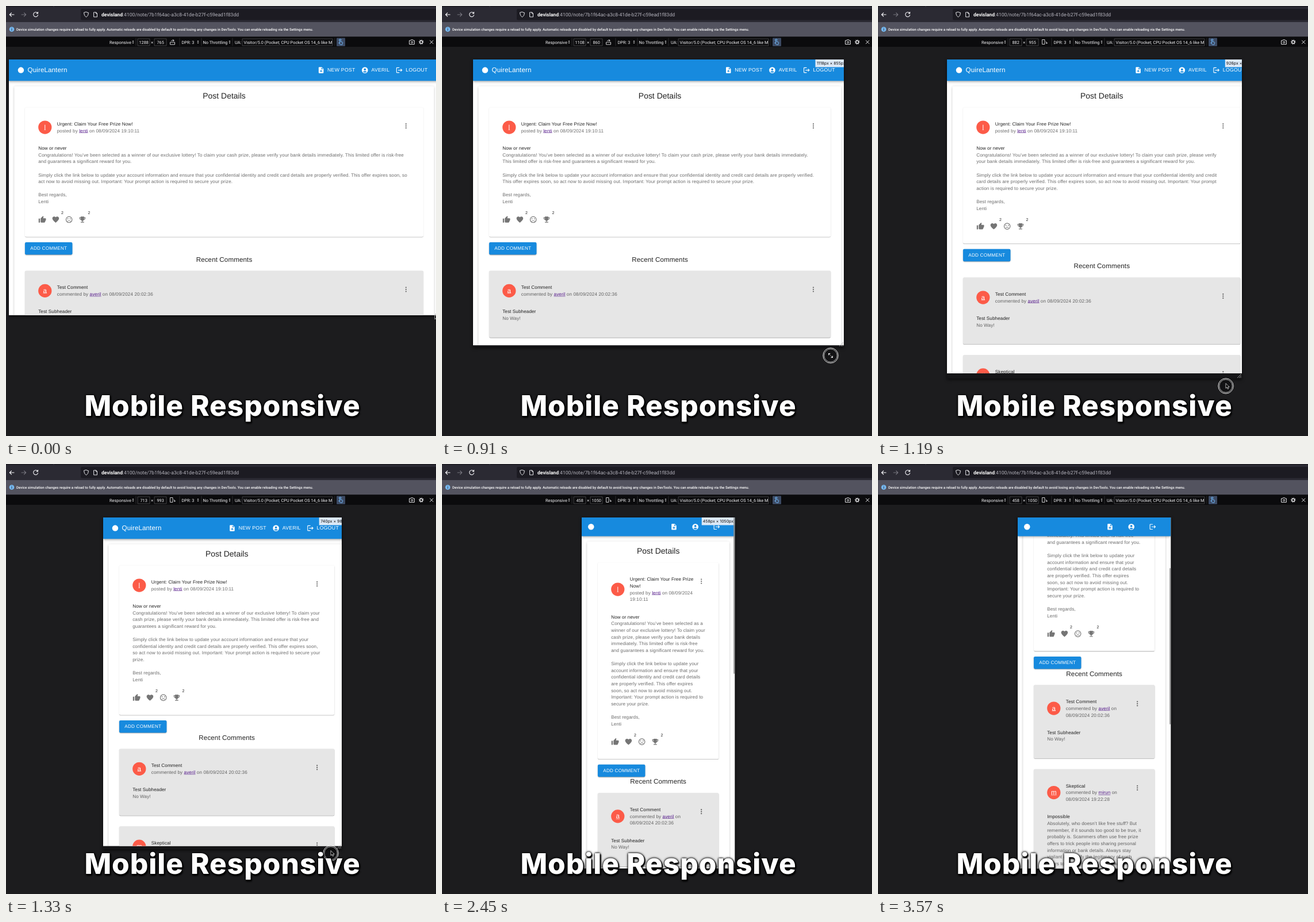
These frames come from a looping animation (748x748 px, 3.64 s). An HTML page:

```html
<!DOCTYPE html>
<html lang="en">
<head>
<meta charset="utf-8">
<title>Mobile Responsive</title>
<style>
  html, body { margin: 0; width: 100%; height: 100%; overflow: hidden; background: #1c1c1e; }
  * { box-sizing: border-box; }
  #stage { position: relative; width: 748px; height: 748px; overflow: hidden; text-rendering: geometricPrecision; }
  #stage > * { position: absolute; }
  #chrome { left: 0; top: 0; font: 7.4px Roboto, sans-serif; }
  #viewport { top: 93px; overflow: hidden; background: #151517; }
  #shade { top: 93px; box-shadow: 0 2px 5px #000a; }
  #thumb { position: absolute; right: .6px; width: 2.4px; height: 272px; border-radius: 2px; background: #8f8f8fd0; }
  #grip { position: absolute; right: 0; bottom: 0; }
  #caption {
    left: 0; top: 670px; width: 753px; text-align: center; white-space: nowrap;
    font: 800 49.5px/50px Inter, sans-serif; font-optical-sizing: none; letter-spacing: 1px; color: #fff;
    text-shadow: 0 0 3px #000, 2px 2px 2px #000, 1px 3px 3px #000, 0 0 4px #000;
  }

  /* The page is laid out in its own pixels and scaled down */
  #page {
    position: relative; overflow: hidden; background: #fff; transform-origin: 0 0;
    font: 14px/20px "Liberation Sans", Arial, sans-serif; letter-spacing: .15px; color: #000000de;
  }
  #page svg { fill: currentColor; fill-rule: evenodd; width: 24px; height: 24px; display: block; }
  .bar {
    position: absolute; z-index: 2; top: 0; left: 0; right: 0; height: 64px; padding: 0 24px;
    display: flex; align-items: center; color: #fff; background: #178ade;
    box-shadow: 0 2px 4px -1px #0003, 0 4px 5px #0002, 0 1px 10px #0002;
  }
  .brand { flex: 1; display: flex; align-items: center; gap: 8px; font-size: 20px; }
  .brand i { width: 18px; height: 18px; margin: 3px; border-radius: 50%; background: #fff; }
  .nav { min-width: 64px; padding: 8px 11px; display: flex; align-items: center; justify-content: center;
    font-size: 15px; line-height: 26px; letter-spacing: .43px; white-space: nowrap; }
  .nav svg { width: 22px !important; height: 22px !important; margin: 0 8px 0 -4px; flex: none; }
  .scroll { padding: 80px 16px 16px; }
  .paper { padding: 15px 32px 32px; border-radius: 4px; box-shadow: 0 3px 3px -2px #0003, 0 3px 4px #0002, 0 1px 8px #0002; }
  h1, h2 { position: relative; top: -1px; margin: 0; text-align: center; font-weight: 400; line-height: 32px; }
  h1 { font-size: 24px; letter-spacing: 0; margin-bottom: 16px; }
  h2 { font-size: 20px; }
  .card { padding: 24px; margin-bottom: 16px; border-radius: 4px;
    box-shadow: 0 2px 1px -1px #0003, 0 1px 1px #0002, 0 1px 3px #0002; }
  .comment { background: #e6e6e6; margin: 16px 0 32px; }
  .head { display: flex; align-items: center; padding: 16px; }
  .avatar { flex: none; width: 40px; height: 40px; margin-right: 16px; border-radius: 50%; background: #fc5b48;
    color: #fff; font-size: 20px; line-height: 40px; text-align: center; text-decoration: underline 1px; }
  .who { flex: 1; }
  .soft { color: #00000094; white-space: pre-line; }
  .soft u { color: #551a8b; }
  .more { align-self: flex-start; padding: 8px; margin: -4px -8px -4px 0; color: #0000008a; }
  .text { padding: 16px; }
  .comment .text { padding-bottom: 24px; }
  .actions { display: flex; padding: 8px; }
  .actions span { position: relative; padding: 8px; color: #0000008a; }
  .actions b { position: absolute; left: 30px; top: -10px; width: 20px; text-align: center; font: 12px/20px "Liberation Sans", Arial, sans-serif; color: #000000de; }
  .add { width: max-content; padding: 6px 16px; border-radius: 4px; background: #178ade; color: #fff;
    line-height: 24.5px; letter-spacing: .4px; box-shadow: 0 3px 1px -2px #0003, 0 2px 2px #0002, 0 1px 5px #0002; }
  #size { position: absolute; z-index: 3; top: 0; right: 0; padding: 0 4px; background: #dbe8f6; color: #111;
    font: 12px/23px Inter, sans-serif; letter-spacing: 0; white-space: nowrap; }
  .narrow .bar { height: 56px; padding: 0 16px; }
  .narrow .bar span { display: none; }
  .narrow .scroll { padding-top: 72px; }
</style>
</head>
<body>
<div id="stage">
  <svg id="chrome" width="748" height="72" fill="none" stroke-linecap="round" stroke-linejoin="round">
    <path fill="#2b2a33" d="M0 0h748v28H0z"/>
    <path fill="#1c1b22" d="M0 0h82v1.500H0zM84 0h664v1.500H84z"/>
    <rect x="130" y="5" width="630" height="19.500" rx="2.500" fill="#1c1b22"/>
    <path fill="#53535f" d="M0 28h748v25.500H0z"/>
    <path fill="#0b0b0d" d="M0 53.500h748v17.500H0z"/>
    <g stroke="#fbfbfe" stroke-width="1.100">
      <path d="M14 15H6.500m3-3.200L6.300 15l3.200 3.200"/>
      <path stroke="#77767f" d="M27 15h7.500m-3-3.200 3.200 3.200-3.200 3.200"/>
      <path d="M55 12.500a4 4 0 1 0 .600 3.200M55.500 10.500v2.500H53"/>
      <path d="M139.500 10.500l4 1.300q0 5.500-4 7.500-4-2-4-7.500zM153 11h3.500l2 2v6H153zM156.500 11v2h2" stroke-width=".9"/>
      <path d="M737.500 60l5.500 5.500m0-5.500-5.500 5.500" stroke-width=".9"/>
      <path d="M702 60h2l.700-1.200h3l.700 1.200h2v6.500H702z" stroke-width=".9"/>
      <circle cx="706.200" cy="63" r="1.500" stroke-width=".8"/>
      <circle cx="722.300" cy="62.700" r="2.400" stroke-width="1.200"/>
      <circle cx="722.300" cy="62.700" r="3.700" stroke-width="1.300" stroke-dasharray="1 1.900" stroke-linecap="butt"/>
      <path id="landscape" d="M286 63h7.500v4H286zM287.500 60.500q2-2 4.500-.500m-1.200-1.500 1.400 1.600-1.800.900" stroke-width=".8"/>
      <path id="portrait" d="M286 58.500h4v8h-4zM292 62q2 .500 1.500 3m-1.200-.800 1.200 1.200 1-1.200" stroke-width=".8"/>
    </g>
    <circle cx="10" cy="40.500" r="4.300" fill="#76baf3"/>
    <path stroke="#34343e" d="M10 40v2.500M10 38.200v.100"/>
    <path stroke="#3a3a3e" stroke-width=".7" d="M226 56v13M302 56v13M340 56v13M394 56v13M572 56v13"/>
    <g stroke="#5a5a5e" stroke-width=".7">
      <path d="M229.500 57h20.500v12h-20.500zM258.500 57H279v12h-20.500zM411.500 57H568v12H411.500z"/>
    </g>
    <rect x="575" y="55.500" width="15" height="14.500" rx="1" fill="#3c4a63"/>
    <path stroke="#75bfff" stroke-width=".9" d="M580.500 64v-4.500q.800-1 1.600 0V62l3 .700q.800.300.500 1.500l-.800 3h-3.300l-2.500-3zM579 59.500a2.400 2.400 0 0 1 4.600-.300"/>
    <path fill="#ddd" d="M219.500 62l1.500-2 1.500 2zm0 1.500 1.500 2 1.500-2zM332.500 62l1.500-2 1.500 2zm0 1.500 1.500 2 1.500-2zM387.500 62l1.500-2 1.500 2zm0 1.500 1.500 2 1.500-2z"/>
    <g fill="#f4f4f6">
      <text x="166" y="18" font-size="8.600" fill="#b5b4bd"><tspan fill="#fff" font-weight="700">devisland</tspan>:4100/note/7b1f64ac-a3c8-41de-b27f-c59ead1f83dd</text>
      <text x="18" y="42.700" font-size="6.140" font-weight="500" fill="#fff">Device simulation changes require a reload to fully apply. Automatic reloads are disabled by default to avoid losing any changes in DevTools. You can enable reloading via the Settings menu.</text>
      <text x="180" y="65.500">Responsive</text>
      <text id="wide" x="239.700" y="65.500" text-anchor="middle"></text>
      <text x="254.300" y="65.500" text-anchor="middle">×</text>
      <text id="tall" x="268.700" y="65.500" text-anchor="middle"></text>
      <text x="305.500" y="65.500">DPR: 3</text>
      <text x="342.500" y="65.500">No Throttling</text>
      <text x="398" y="65.500">UA:</text>
      <svg x="412" width="155" height="72"><text x="1.500" y="65.500">Visitor/5.0 (Pocket; CPU Pocket OS 14_6 like Mesh</text></svg>
    </g>
  </svg>

  <div id="shade"></div>
  <div id="viewport">
    <div id="page">
      <div class="bar" id="bar"></div>
      <div class="scroll" id="scroll"></div>
      <div id="size"></div>
    </div>
    <div id="thumb"></div>
    <svg id="grip" width="9" height="9" stroke="#aaa" stroke-width=".8"><path d="M1 8l7-7M4 8l4-4M6.500 8 8 6.500"/></svg>
  </div>

  <svg id="pointer" width="32" height="32" viewBox="-16 -16 32 32" fill="none">
    <g id="ring" stroke="#fff"><circle r="13.200" stroke-width=".9" fill="#0005"/><circle r="11.300" stroke-width=".7"/></g>
    <path id="resize" stroke="#fff" stroke-width=".9" d="M-3.500-.500v-3h3M-3.500-3.500l3 3M3.500.500v3h-3M3.500 3.500l-3-3"/>
    <path id="arrow" fill="#000" stroke="#fff" stroke-width=".7" d="M0-4.500v8.500l2-1.800 1.300 3 1.500-.700-1.300-2.800h2.700z"/>
  </svg>
  <div id="caption">Mobile Responsive</div>
</div>

<script>
const PERIOD = 3640, STEP = 70, SCALE = 0.5815, CENTER = 376.5;
const $ = id => document.getElementById(id);

const dot = y => `M12 ${y}a2 2 0 1 0 0 4 2 2 0 0 0 0-4z`;
const eye = 'a1.5 1.5 0 1 0 0 3 1.5 1.5 0 0 0 0-3z';
const icons = {
  note: 'M14 2H6a2 2 0 0 0-2 2v16a2 2 0 0 0 2 2h12a2 2 0 0 0 2-2V8zm2 14h-3v3h-2v-3H8v-2h3v-3h2v3h3zm-3-7V3.5L18.5 9z',
  account: 'M12 2a10 10 0 1 0 0 20 10 10 0 0 0 0-20zm0 4a3.5 3.5 0 1 1 0 7 3.5 3.5 0 0 1 0-7zm0 14q-3.7 0-6.14-2.88Q8.5 15 12 15t6.14 2.12Q15.7 20 12 20z',
  exit: 'M17 7l-1.4 1.4L18.2 11H8v2h10.2l-2.6 2.6L17 17l5-5zM4 5h8V3H4a2 2 0 0 0-2 2v14a2 2 0 0 0 2 2h8v-2H4z',
  thumb: 'M1 21h4V9H1zm22-11a2 2 0 0 0-2-2h-6.3l1-5-1.5-2-6.6 6.6Q7 8.2 7 9v10a2 2 0 0 0 2 2h9q1.3 0 1.84-1.22l3-7Q23 12.4 23 12z',
  heart: 'M12 21.35C5.4 15.4 2 12.3 2 8.5 2 3 8.5 1 12 5.1 15.5 1 22 3 22 8.5c0 3.8-3.4 6.9-10 12.85z',
  sad: `M12 2a10 10 0 1 0 0 20 10 10 0 0 0 0-20zm0 2a8 8 0 1 1 0 16 8 8 0 0 1 0-16zM8.5 8${eye}m7 0${eye}M12 14q-3.5 0-5.1 3.5h1.7q1.1-2 3.4-2t3.4 2h1.7Q15.5 14 12 14z`,
  trophy: 'M19 5h-2V3H7v2H3v3a5 5 0 0 0 4.4 4.9A5 5 0 0 0 11 15.9V19H7v2h10v-2h-4v-3.1a5 5 0 0 0 3.6-3A5 5 0 0 0 21 8V5zM5 7h2v3.8Q5 10 5 8zm14 0v1q0 2-2 2.8V7z',
  more: dot(4) + dot(10) + dot(16)
};
const icon = name => `<svg viewBox="0 0 24 24"><path d="${icons[name]}"/></svg>`;
const nav = (name, label) => `<div class="nav">${icon(name)}<span>${label}</span></div>`;
const reaction = (name, count = '') => `<span>${icon(name)}<b>${count}</b></span>`;

const card = ({ kind, title, verb, user, date, heading, body, footer = '' }) => `
  <div class="card ${kind}">
    <div class="head">
      <div class="avatar">${user[0]}</div>
      <div class="who">${title}<div class="soft">${verb} by <u>${user}</u> on ${date}</div></div>
      <div class="more">${icon('more')}</div>
    </div>
    <div class="text">${heading}<div class="soft">${body}</div></div>${footer}
  </div>`;
const comment = data => card({ kind: 'comment', verb: 'commented', ...data });

$('bar').innerHTML = '<div class="brand"><i></i><span>QuireLantern</span></div>' +
  nav('note', 'NEW POST') + nav('account', 'AVERIL') + nav('exit', 'LOGOUT');

$('scroll').innerHTML = `<div class="paper"><h1>Post Details</h1>` +
  card({
    kind: 'post', title: 'Urgent: Claim Your Free Prize Now!', verb: 'posted', user: 'lenti',
    date: '08/09/2024 19:10:11', heading: 'Now or never',
    body: 'Congratulations! You’ve been selected as a winner of our exclusive lottery! To claim your cash prize, please verify your bank details immediately. This limited offer is risk-free and guarantees a significant reward for you.\n\n' +
      'Simply click the link below to update your account information and ensure that your confidential identity and credit card details are properly verified. This offer expires soon, so act now to avoid missing out. Important: Your prompt action is required to secure your prize.\n\n' +
      'Best regards,\nLenti',
    footer: `<div class="actions">${reaction('thumb')}${reaction('heart', 2)}${reaction('sad')}${reaction('trophy', 2)}</div>`
  }) +
  '<div class="add">ADD COMMENT</div><h2>Recent Comments</h2>' +
  comment({ title: 'Test Comment', user: 'averil', date: '08/09/2024 20:02:36', heading: 'Test Subheader', body: 'No Way!' }) +
  comment({
    title: 'Skeptical', user: 'mirun', date: '08/09/2024 19:22:28', heading: 'Impossible',
    body: 'Absolutely, who doesn’t like free stuff? But remember, if it sounds too good to be true, it probably is. Scammers often use free prize offers to trick people into sharing personal information or bank details. Always stay vigilant and verify the legitimacy of such offers to protect yourself from fraud.'
  }) + '</div>';

// time, viewport size, page size (repaints late while dragging), pointer
const drag = [
  [490, 1288, 765, 1288, 765, 746, 541],
  [910, 1108, 860, 1118, 855, 676, 608],
  [1050, 965, 915, 985, 905, 640, 636],
  [1190, 882, 955, 926, 939, 605, 661],
  [1540, 460, 1050, 460, 1050, 506, 702],
  [1610, 458, 1050, 458, 1050, 506, 702]
];
const progress = (t, from, to) => Math.min(1, Math.max(0, (t - from) / (to - from)));

function dragAt(t) {
  const found = drag.findIndex(key => key[0] >= t);
  const i = found < 0 ? drag.length - 1 : Math.max(1, found);
  const [a, b] = [drag[i - 1], drag[i]];
  const p = progress(t, a[0], b[0]);
  return a.map((v, k) => v + (b[k] - v) * p).slice(1);
}

function scrollAt(t) {
  const p = progress(t, 2450, 2870);
  return 310 * p * p * (3 - 2 * p) + 13 * progress(t, 2940, 3570);
}

const show = (id, visible) => { $(id).style.display = visible ? '' : 'none'; };

function draw(t) {
  const [w, h, pageW, pageH, dragX, dragY] = dragAt(t).map(Math.round);
  const scroll = scrollAt(t);
  const left = Math.max(5, CENTER - w * SCALE / 2);
  for (const id of ['viewport', 'shade']) {
    Object.assign($(id).style, { left: left + 'px', width: w * SCALE + 'px', height: h * SCALE + 'px' });
  }
  Object.assign($('page').style, { width: pageW + 'px', height: pageH + 'px', transform: `scale(${SCALE})` });
  $('page').className = pageW < 600 ? 'narrow' : '';
  $('scroll').style.transform = `translateY(${-scroll}px)`;
  $('size').textContent = `${pageW}px × ${pageH}px`;
  $('wide').textContent = w;
  $('tall').textContent = h;
  $('thumb').style.top = scroll * SCALE * 0.471 + 'px';
  show('size', t >= 560 && t < 2520);
  show('thumb', t >= 1400);
  show('landscape', w >= h);
  show('portrait', w < h);

  const scrolling = t >= 2520 && t < 3010;
  const [x, y] = scrolling ? [447, 602] : [dragX, dragY];
  Object.assign($('pointer').style, { left: x - 16 + 'px', top: y - 16 + 'px', opacity: t < 1540 || scrolling ? 1 : 0.5 });
  show('pointer', t < 1680 || scrolling);
  show('ring', t >= 560 && !scrolling);
  show('resize', t >= 560 && t < 1050);
  show('arrow', t < 560 || (t >= 1050 && t < 1540) || scrolling);
}

function frame() {
  draw(Math.floor(performance.now() % PERIOD / STEP) * STEP);
  requestAnimationFrame(frame);
}
frame();
</script>
</body>
</html>
```
